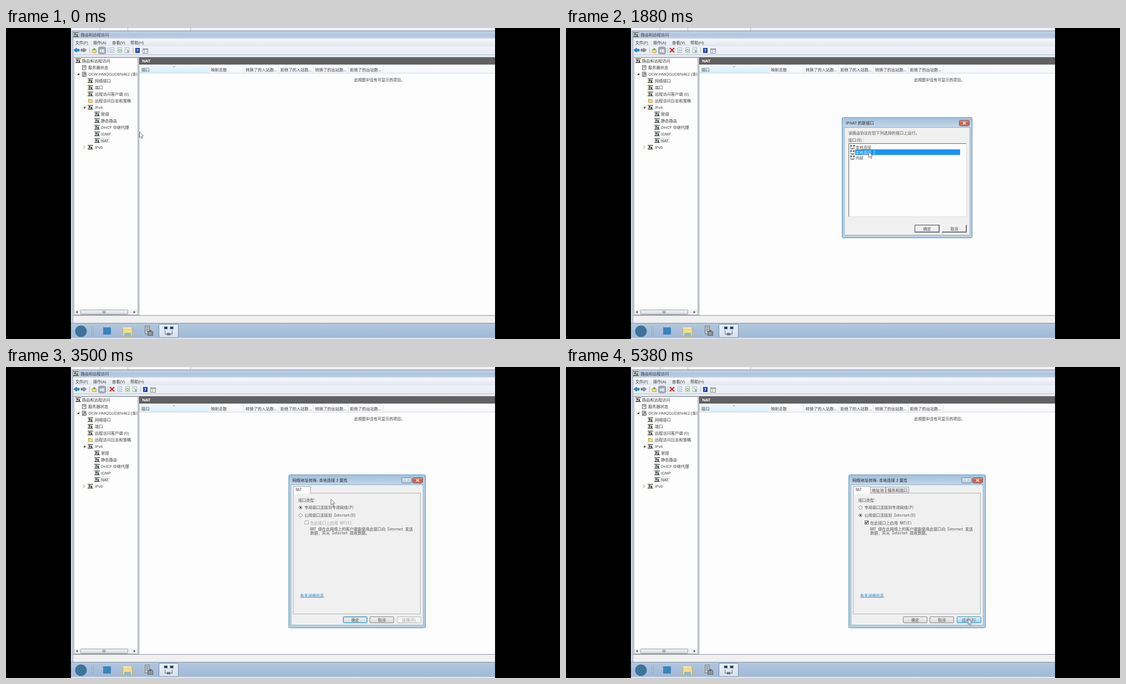
These frames come from a looping animation (998x561 px, 5420 ms). An HTML page with a canvas:

```html
<!DOCTYPE html>
<html lang="zh-CN">
<head>
<meta charset="utf-8">
<style>
html, body { margin: 0; width: 100%; height: 100%; overflow: hidden; background: #000; }
canvas { display: block; }
</style>
</head>
<body>
<canvas id="stage" width="998" height="561"></canvas>
<script>
const g = document.getElementById('stage').getContext('2d');
const LOOP = 5420;
const UI = "7.25px 'Open Sans', 'Noto Sans CJK SC', 'Noto Sans CJK', sans-serif";
const DLG = "7.13px 'Noto Sans Mono CJK SC', 'Noto Sans CJK SC', 'Noto Sans CJK', monospace";
const INK = '#3c3c3c', SOFT = '#505050';

// Moments at which the interface reacts
const AT = { menu: 440, pick: 800, list: 900, select: 1850, ok: 3020, props: 3150, radio: 3900, check: 4540, apply: 5130 };

// Pointer stops: time, x, y
const stops = [
  [60, 240, 187], [380, 188, 204], [640, 188, 204], [760, 206, 211], [830, 206, 211],
  [1130, 387, 233], [1760, 545, 223], [2080, 545, 223], [2590, 617, 266], [2950, 650, 360],
  [3120, 650, 360], [3500, 585, 238], [3820, 578, 266], [3960, 578, 266], [4250, 585, 280],
  [4460, 543, 280], [4640, 543, 280], [5120, 724, 454]
];

function box(x, y, w, h, fill, line) {
  if (fill) { g.fillStyle = fill; g.fillRect(x, y, w, h); }
  if (line) { g.strokeStyle = line; g.lineWidth = 1; g.strokeRect(x + .5, y + .5, w - 1, h - 1); }
}
function round(x, y, w, h, r, fill, line) {
  g.beginPath();
  g.roundRect(x + .5, y + .5, w - 1, h - 1, r);
  g.fillStyle = fill; g.fill();
  if (line) { g.strokeStyle = line; g.lineWidth = 1; g.stroke(); }
}
function shade(y, h, ...colors) {
  const s = g.createLinearGradient(0, y, 0, y + h);
  colors.forEach((c, i) => s.addColorStop(i / (colors.length - 1), c));
  return s;
}
function text(s, x, y, color = INK, font = UI, align = 'left') {
  g.font = font; g.fillStyle = color; g.textAlign = align; g.textBaseline = 'alphabetic';
  g.fillText(s, x, y + 2.7);
}
function poly(points, fill, line, width = 1) {
  g.beginPath();
  points.forEach(([x, y]) => g.lineTo(x, y));
  if (fill) { g.closePath(); g.fillStyle = fill; g.fill(); }
  if (line) { g.strokeStyle = line; g.lineWidth = width; g.stroke(); }
}
function disc(x, y, r, fill, line) {
  g.beginPath(); g.arc(x, y, r, 0, 7);
  if (fill) { g.fillStyle = fill; g.fill(); }
  if (line) { g.strokeStyle = line; g.lineWidth = 1; g.stroke(); }
}

// Icons, placed by their centre
function netIcon(x, y) {
  box(x - 5, y - 4, 10, 1, '#35392c');
  box(x - 4, y - 3, 8, 6, '#d5dbc6');
  box(x - 3, y - 2, 3, 3, '#4d5563');
  box(x + 1, y - 1, 2, 4, '#3f4650');
  box(x - 3, y + 2, 2, 1, '#555');
  box(x - 5, y + 3, 10, 1, '#30342c');
}
function serverIcon(x, y) {
  box(x - 4, y - 4, 7, 9, '#e4e4e4', '#6d6d6d');
  box(x - 2, y - 2, 4, 1, '#777'); box(x - 2, y, 4, 1, '#999');
  box(x + 2, y - 3, 2, 7, '#a9a9a9');
}
function hostIcon(x, y) {
  serverIcon(x, y);
  disc(x + 1, y + 2, 2.6, '#fff', '#555');
  poly([[x + 1, y + .5], [x + 3, y + 2.5], [x - 1, y + 2.5]], '#29a23a');
}
function folderIcon(x, y, k = 1) {
  box(x - 4 * k, y - 3 * k, 4 * k, 2 * k, '#d6b64e');
  box(x - 4 * k, y - 2 * k, 8 * k, 6 * k, '#f3dd8c', '#bfa659');
}
function pageIcon(x, y, mark) {
  box(x - 4, y - 5, 8, 10, '#f7f9fc', '#a7b1c0');
  if (mark === 'list') for (let i = -2; i < 4; i += 2) box(x - 2, y + i, 4, 1, '#9cb0cc');
  if (mark === 'refresh') disc(x, y + .5, 2.2, null, '#3ea436');
  if (mark === 'export') { poly([[x, y - 1], [x + 5, y + 2], [x, y + 5]], '#8cc06a'); box(x - 2, y - 2, 3, 1, '#caa94a'); }
}
function paneIcon(x, y, on) {
  if (on) round(x - 7, y - 6, 14, 13, 2, '#c7d4e5', '#667d99');
  box(x - 5, y - 4, 10, 9, '#fff', '#7d8794');
  box(x - 4, y - 3, 8, 2, '#b4bac3');
  box(x - 2, y - 1, 1, 5, '#7d8794');
  box(x + 1, y + 1, 2, 1, '#57a151');
}
function arrowIcon(x, y, dir, fill, line) {
  poly([[-5, 0], [0, -4], [0, -2], [5, -2], [5, 2], [0, 2], [0, 4], [-5, 0]]
    .map(([a, b]) => [x + a * dir, y + b]), fill, line, .7);
}
function linkIcon(x, y, k = 1) {
  const screen = (a, b) => {
    box(x + a * k, y + b * k, 4 * k, 3.5 * k, '#d8dcd7');
    box(x + (a + .7) * k, y + (b + .6) * k, 2.7 * k, 2 * k, '#1e3d70');
  };
  poly([[x - 3 * k, y], [x - 3 * k, y + 3 * k], [x + 3 * k, y + 3 * k], [x + 3 * k, y]], null, '#444', .8);
  screen(-4.5, -4); screen(.6, -4);
  box(x - 1.5 * k, y + 2 * k, 3 * k, 2 * k, '#6c7672');
}
function divider(x, y) { box(x, y, 1, 10, '#aab6c6'); }

function toolbar(full) {
  arrowIcon(127, 40, 1, '#2f8ed8', '#1e68a8');
  arrowIcon(140, 40, -1, '#8d9399', '#666c73');
  divider(150, 35);
  folderIcon(159, 41);
  poly([[159, 36], [162, 39], [156, 39]], '#52a836');
  paneIcon(173, 40, true);
  divider(183, 35);
  if (full) {
    poly([[187, 36], [195, 44]], null, '#d02727', 2.2);
    poly([[195, 36], [187, 44]], null, '#d02727', 2.2);
  }
  const dx = full ? 14 : 0;
  pageIcon(191 + dx, 40, 'list');
  pageIcon(205 + dx, 40, 'refresh');
  pageIcon(218 + dx, 40, 'export');
  divider(228 + dx, 35);
  box(233 + dx, 36, 8, 9, '#2b4fae', '#1d3a85');
  text('?', 237 + dx, 40, '#fff', "bold 7px 'Open Sans', sans-serif", 'center');
  paneIcon(251 + dx, 41);
}

function tree() {
  box(122, 53, 116, 465, '#fdfdfd', '#a2a9b3');
  netIcon(130, 59); text('路由和远程访问', 137, 59);
  serverIcon(141, 71); text('服务器状态', 148, 71);
  poly([[132, 81], [132, 85], [128, 85]], '#333');
  hostIcon(141, 83);
  g.save();
  g.beginPath(); g.rect(122, 53, 114.5, 465); g.clip();
  text('DCW-HMQGUD8N4K2 (本地)', 148.5, 83);
  g.restore();
  ['网络接口', '端口', '远程访问客户端 (0)', '远程访问日志和策略', 'IPv4'].forEach((s, i) => {
    const y = 95 + 12 * i;
    (i === 3 ? folderIcon : netIcon)(152, y);
    text(s, 160, y);
  });
  poly([[143, 141], [143, 145], [139, 145]], '#333');
  box(169, 197, 18, 11, '#ececec');
  ['常规', '静态路由', 'DHCP 中继代理', 'IGMP', 'NAT'].forEach((s, i) => {
    netIcon(164, 155 + 12 * i);
    text(s, 171, 155 + 12 * i);
  });
  poly([[140, 212], [143, 215], [140, 218], [140, 212]], null, '#aaa', .8);
  netIcon(152, 215); text('IPv6', 160, 215);
  // Horizontal scrollbar
  box(123, 508, 114, 9, '#f0f0f0');
  poly([[129, 510], [129, 515], [126, 512.5]], '#444');
  poly([[230, 510], [230, 515], [233, 512.5]], '#444');
  round(134, 508, 86, 9, 1, shade(508, 9, '#f4f4f4', '#d6d8dc'), '#9a9fa8');
  for (let i = 0; i < 3; i++) box(174 + 2 * i, 510, 1, 5, '#777');
}

function listPane() {
  box(239, 53, 642, 465, '#fdfdfd');
  box(239, 53, 1, 465, '#88909b');
  box(240, 53, 641, 13, '#616161');
  text('NAT', 245, 59.5, '#fff', "bold 7.5px 'Open Sans', sans-serif");
  box(240, 66, 641, 15, shade(66, 15, '#fff', '#f3f5f8'));
  box(240, 67, 125, 14, shade(67, 14, '#f1f9fe', '#d6edf9'));
  box(240, 81, 641, 1, '#d7dbe1');
  poly([[300, 69], [305, 69], [302.5, 71]], '#8ca7b8');
  ['接口', '映射总数', '转换了的入站数...', '拒绝了的入站数...', '转换了的出站数...', '拒绝了的出站数...'].forEach((s, i) => {
    text(s, i ? 306.5 + 62.6 * i : 244, 75);
    box(Math.round(365.6 + 62.6 * i), 68, 1, 13, '#dfe3e9');
  });
  text('此视图中没有可显示的项目。', 627, 93.5, INK, UI.replace('7.25', '7.05'));
}

function taskbar() {
  box(117, 533, 764, 26, shade(533, 26, '#b4c7dd', '#a8bfda', '#a2bad7'));
  box(117, 532, 764, 1, '#8292a8');
  box(117, 559, 764, 2, '#dfe8f2');
  disc(135, 547, 10.5, '#3f7398');
  for (let y = 538; y < 556; y += 3) for (let x = 154; x < 160; x += 3) box(x, y, 1, 1, '#718aa9');
  box(175, 540, 14, 13, '#3d83b8');
  folderIcon(219, 547, 2.3);
  box(211, 540, 15, 3, '#f8eaae');
  box(213, 550, 12, 5, '#87b8d8');
  // Server tower with toolbox
  box(250, 537, 9, 15, '#c4c8ca', '#757b80');
  for (let i = 0; i < 3; i++) box(252, 540 + 3 * i, 5, 1, '#6f7a80');
  box(255, 547, 10, 8, '#8f979c', '#596167');
  box(258, 545, 4, 2, '#596167');
  round(275, 534, 36, 25, 2, shade(534, 25, '#eaf1f9', '#d3dfed'), '#7489a5');
  linkIcon(293, 546, 2.1);
}

function desktop(full) {
  box(0, 0, 998, 561, '#000');
  box(117, 0, 764, 561, '#cfdbe9');
  box(117, 0, 764, 6, '#eef2f7');
  box(120, 1, 213, 4, '#fafbfd'); box(120, 4, 761, 1, '#c6cfdb');
  for (const x of [169, 219, 332]) box(x, 0, 1, 5, '#aab3bf');
  box(118, 5, 763, 1, '#8f9db0');
  box(119, 6, 762, 13, shade(6, 13, '#c4d4e7', '#afc4de', '#c0d1e5'));
  netIcon(126, 12); text('路由和远程访问', 134.5, 12);
  box(121, 19, 760, 14, shade(19, 14, '#f7f9fc', '#e0e6f0'));
  ['文件(F)', '操作(A)', '查看(V)', '帮助(H)'].forEach((s, i) => text(s, [125, 157, 191, 224][i], 26));
  box(121, 33, 760, 15, shade(33, 15, '#f1f4f9', '#e6ebf3'));
  box(121, 48, 760, 4, '#f0f2f5'); box(121, 48, 760, 1, '#b5bdc9'); box(121, 52, 760, 1, '#a9b1bc');
  box(121, 53, 760, 466, '#edf0f4');
  toolbar(full);
  tree();
  listPane();
  box(121, 518, 760, 14, '#f0f0f0'); box(121, 518, 760, 1, '#9299a3');
  box(120, 6, 1, 526, '#8f9cad');
  taskbar();
}

function contextMenu(hover) {
  box(170, 206, 143, 145, 'rgba(0,0,0,.22)');
  box(168, 204, 143, 145, '#f0f0f0', '#979797');
  box(184, 206, 1, 141, '#e4e4e4');
  if (hover) round(170, 206, 139, 12, 1.5, '#dfeaf6', '#afcfe9');
  const items = [[211.5, '新增接口(I)...'], [229.5, '显示 DHCP 分配器信息(A)...'], [242.5, '显示 DNS 代理信息(N)...'],
    [260.5, '查看(V)'], [278.5, '删除(D)'], [291.5, '刷新(F)'], [304.5, '导出列表(L)...'], [322.5, '属性(R)'], [340.5, '帮助(H)']];
  items.forEach(([y, s]) => text(s, 189, y));
  for (const y of [220, 251, 269, 313, 331]) box(185, y, 123, 1, '#d5d5d5');
  poly([[302, 258], [302, 263], [304.5, 260.5]], '#222');
}

function frame(x, y, w, h, title) {
  round(x, y, w, h, 2, '#b4d0e8', '#578fae');
  box(x + 1, y + 2, w - 2, 15, shade(y + 2, 15, '#a3c0dd', '#c3d6e9'));
  box(x + 4, y + 18, w - 8, h - 23, '#f0f0f0', '#9bb4c8');
  text(title, x + 7, y + 10.5, '#222');
  const cx = x + w - 24;
  round(cx, y + 5, 19, 11, 2, shade(y + 5, 11, '#dda99f', '#c25a4a', '#d38676'), '#7d5050');
  poly([[cx + 7, y + 8.5], [cx + 12, y + 12.5]], null, '#fff', 1.4);
  poly([[cx + 12, y + 8.5], [cx + 7, y + 12.5]], null, '#fff', 1.4);
}

function classicButton(x, label, main) {
  box(x, 355, 45, 14, '#f0f0f0', main ? '#4a4a68' : '#f8f8f8');
  box(x + 1, 367, 43, 1, '#8d8d8d'); box(x + 43, 356, 1, 12, '#8d8d8d');
  box(x, 368, 45, 1, '#5f5f5f'); box(x + 44, 355, 1, 14, '#5f5f5f');
  text(label, x + 22.5, 362, SOFT, DLG, 'center');
}
function listDialog(selected) {
  frame(497, 161, 235, 218, 'IPNAT 的新接口');
  text('该路由协议在您下列选择的接口上运行。', 508.5, 189.5, SOFT, DLG);
  text('接口(N):', 508.5, 202.5, SOFT, DLG);
  box(509, 208, 213, 133, '#fdfdfd', '#dedede');
  box(509, 208, 212, 1, '#6b6b6b'); box(509, 208, 1, 132, '#6b6b6b');
  ['本地连接', '本地连接 2', '内部'].forEach((s, i) => {
    const y = 215 + 9.4 * i, on = i === selected;
    if (on) box(521, Math.round(y - 5), 189, 10, '#1b92f5');
    linkIcon(516, y);
    text(s, 521.5, y, on ? '#fff' : SOFT, DLG);
  });
  classicButton(628, '确定', true);
  classicButton(677, '取消');
}

function button(x, w, label, state) {
  const hot = state === 'hot', off = state === 'off';
  round(x, 450, w, 12, 1.5, off ? '#f4f4f4' : hot ? shade(450, 12, '#e5f4fc', '#98d1ef') : shade(450, 12, '#f2f2f2', '#d9d9d9'),
    hot || state === 'main' ? '#3c8fb4' : off ? '#b5b8bc' : '#858585');
  if (state === 'main') box(x + 1, 451, w - 2, 10, null, '#8fd6ee');
  text(label, x + w / 2, 456.5, off ? '#929292' : SOFT, DLG, 'center');
}
function radio(y, label, on) {
  disc(530.5, y, 2.9, '#fff', '#888');
  if (on) disc(530.5, y, 1.4, '#222');
  text(label, 537.5, y, SOFT, DLG);
}
function propsDialog(isPublic, checked, hot) {
  frame(509, 194, 247, 277, '网络地址转换- 本地连接 2 属性');
  round(712, 199, 19, 11, 2, shade(199, 11, '#d5e2f0', '#b3c8de'), '#7189a2');
  text('?', 721.5, 204, '#fff', "bold 7.5px 'Open Sans', sans-serif", 'center');
  box(517, 227, 230, 219, '#f0f0f0', '#b0b3b8');
  if (isPublic) {
    box(548, 216, 28, 12, shade(216, 12, '#f3f3f3', '#dcdcdc'), '#9ea1a6');
    box(576, 216, 42, 12, shade(216, 12, '#f3f3f3', '#dcdcdc'), '#9ea1a6');
    text('地址池', 551, 222, SOFT, DLG);
    text('服务和端口', 579.5, 222, SOFT, DLG);
  }
  box(517, 215, 32, 14, '#fcfcfc', '#a3a7ad'); box(518, 227, 30, 2, '#f8f8f8');
  text('NAT', 522, 221, SOFT, DLG);
  text('接口类型:', 526.5, 240.5, SOFT, DLG);
  radio(253.5, '专用接口连接到专用网络(P)', !isPublic);
  radio(267.5, '公用接口连接到 Internet(U)', isPublic);
  box(538, 277, 7, 7, '#fff', isPublic ? '#666' : '#aaa');
  if (checked) poly([[539.5, 280], [541, 282], [544, 278.3]], null, '#222', 1.3);
  text('在此接口上启用 NAT(E)', 548, 281, isPublic ? SOFT : '#a3a3a3', DLG);
  text('NAT 使在此网络上的客户端能使用此接口向 Internet 发送', 548, 292.5, SOFT, DLG);
  text('数据，并从 Internet 接收数据。', 548, 299.5, SOFT, DLG);
  text('有关详细信息', 530, 412, '#2284d4', DLG);
  box(530, 415, 43, 1, '#4c9cdc');
  button(607, 44, '确定', hot ? '' : 'main');
  button(655, 44, '取消');
  button(704, 44, '应用(A)', hot ? 'hot' : isPublic ? '' : 'off');
}

function pointerAt(t) {
  const i = stops.findIndex(s => s[0] > t);
  if (i < 1) return (i ? stops[stops.length - 1] : stops[0]).slice(1);
  const [t0, x0, y0] = stops[i - 1], [t1, x1, y1] = stops[i];
  const u = (t - t0) / (t1 - t0), e = u * u * (3 - 2 * u);
  return [x0 + (x1 - x0) * e, y0 + (y1 - y0) * e];
}
function pointer([x, y]) {
  poly([[0, 0], [0, 10], [2.3, 8], [4, 12], [5.6, 11.3], [4, 7.4], [7, 7.2], [0, 0]]
    .map(([a, b]) => [x + .5 + a, y + .5 + b]), '#fff', '#666a76', .9);
}

function draw(t) {
  const pos = pointerAt(t);
  desktop(t >= AT.menu - 60);
  if (t >= AT.menu && t < AT.pick) contextMenu(pos[0] > 194);
  if (t >= AT.list && t < AT.ok) listDialog(t >= AT.select ? 1 : 0);
  if (t >= AT.props) propsDialog(t >= AT.radio, t >= AT.check, t >= AT.apply);
  pointer(pos);
}
const start = performance.now();
function tick() {
  draw((performance.now() - start) % LOOP);
  requestAnimationFrame(tick);
}
tick();
</script>
</body>
</html>
```
